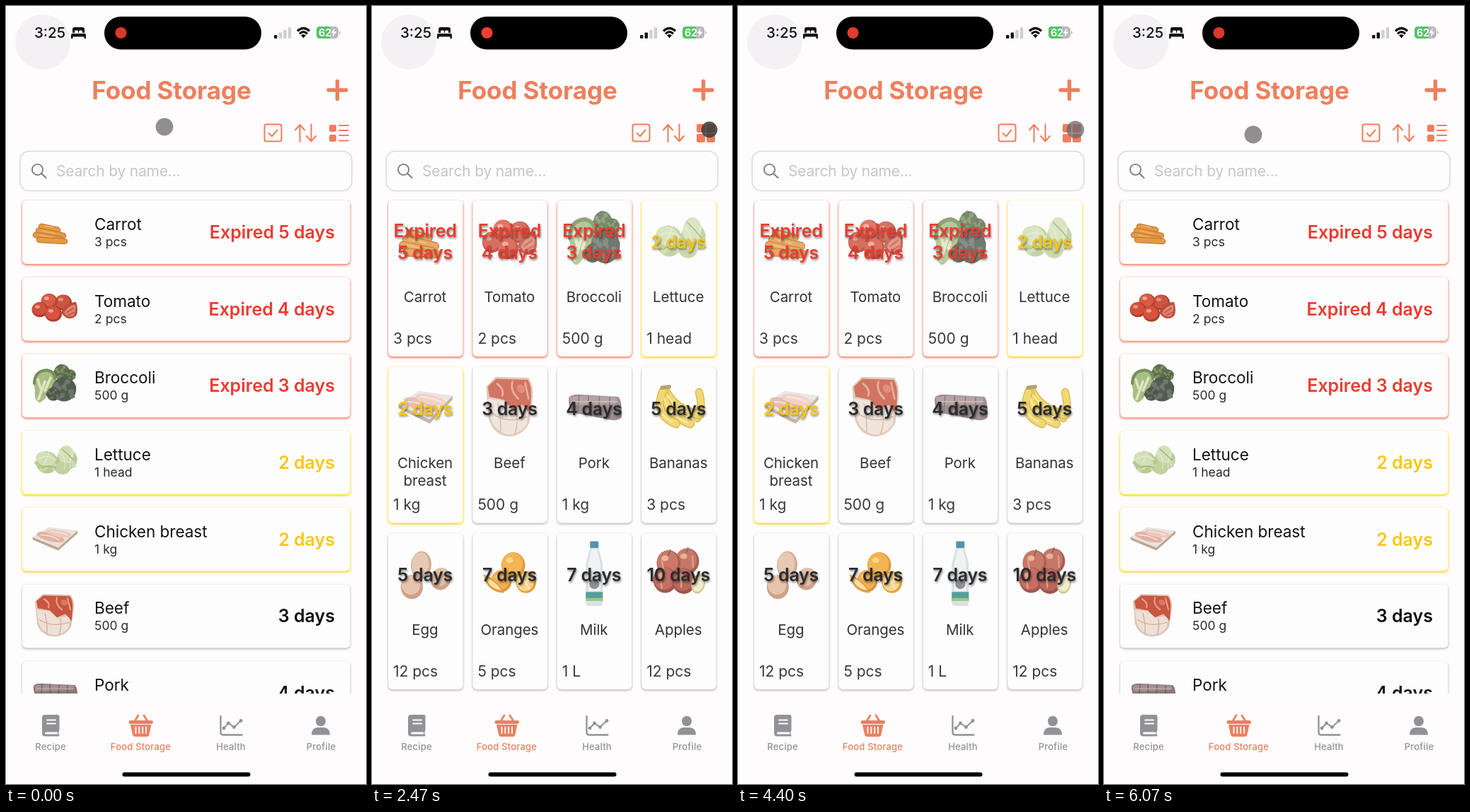
An HTML page for the animation above (6.14 s loop, 509 by 1101 pixels).

```html
<!DOCTYPE html>
<html lang="en">
<head>
<meta charset="utf-8">
<title>Food Storage</title>
<style>
  html, body { margin: 0; width: 100%; height: 100%; overflow: hidden; background: #fefcfd; }
  svg { display: block; width: 100%; height: 100%; font-family: Inter, "Liberation Sans", sans-serif; }
  .red { --edge: #f5927c; }
  .yellow { --edge: #fbdc35; }
  .plain { --edge: #cbcacd; }
  .card { fill: #fefdfe; filter: drop-shadow(0 1.7px .9px var(--edge)) drop-shadow(0 1.2px .9px var(--edge)); }
  .due { font-size: 25px; font-weight: 600; }
  .red .due { fill: #ea3c30; }
  .yellow .due { fill: #f9c713; }
  .plain .due { fill: #0c0c0d; }
  .grid .due { letter-spacing: -.3px; filter: drop-shadow(1px 2px 1.4px rgba(0, 0, 0, .45)); }
  .grid .plain .due { fill: #2b2a2c; }
  .grid .art { opacity: .82; }
  .name { font-size: 22.6px; letter-spacing: -.06px; fill: #121213; }
  .qty { font-size: 17.5px; letter-spacing: .05px; fill: #29292b; }
  .grid .name { font-size: 20.5px; fill: #333235; }
  .grid .qty { font-size: 21px; letter-spacing: 0; fill: #39383b; }
  .mid { text-anchor: middle; }
  .end { text-anchor: end; }
  .tab { font-size: 13px; font-weight: 500; letter-spacing: .2px; text-anchor: middle; }
</style>
</head>
<body>
<svg id="stage" viewBox="0 0 509 1101" xmlns="http://www.w3.org/2000/svg"></svg>
<script>
const ORANGE = '#ee7f5d', GREY = '#929196';
const LOOP = 6140, STEP = LOOP / 92;

const text = (x, y, cls, str, extra = '') => `<text x="${x}" y="${y}" class="${cls}" ${extra}>${str}</text>`;
const rect = (x, y, w, h, r, fill, extra = '') =>
  `<rect x="${x}" y="${y}" width="${w}" height="${h}" rx="${r}" fill="${fill}" ${extra}/>`;
const oval = (x, y, rx, ry, fill, turn = 0) =>
  `<ellipse cx="${x}" cy="${y}" rx="${rx}" ry="${ry}" fill="${fill}" transform="rotate(${turn} ${x} ${y})"/>`;
const shape = (d, fill) => `<path d="${d}" fill="${fill}"/>`;
const line = (d, color, w, extra = '') =>
  `<path d="${d}" fill="none" stroke="${color}" stroke-width="${w}" stroke-linecap="round" stroke-linejoin="round" ${extra}/>`;
const group = (x, y, body, extra = '', scale = '') =>
  `<g transform="translate(${x} ${y}) ${scale}" ${extra}>${body}</g>`;

// A ball with a darker rim and a soft highlight
const ball = (x, y, r, fill, rim, light) =>
  oval(x, y, r, r * .92, rim) + oval(x - r * .08, y - r * .1, r * .88, r * .8, fill) +
  oval(x - r * .3, y - r * .35, r * .3, r * .2, light);

// Bumpy head: small circles around a centre
function floret(x, y, r, fill, light) {
  let out = oval(x, y, r * .86, r * .86, fill);
  for (let i = 0; i < 18; i++) {
    const a = i * 2.4, d = r * .8 * Math.sqrt(i / 18);
    out += oval(x + d * Math.cos(a), y + d * Math.sin(a), r * .2, r * .17, i % 2 ? fill : light);
  }
  return out;
}

const stick = d => line(d, '#c0702a', 8.5) + line(d, '#e39a45', 6.5);
const banana = d => line(d, '#cda62f', 9.5) + line(d, '#efd052', 7.5);

const art = {
  Carrot: () => stick('M-19 -7L4 -2') + stick('M-23 -1L12 6') + stick('M-27 5L8 11') +
    stick('M-22 12L14 14') + line('M-14 -8L-3 -6M-18 -1L0 3M-21 5L-5 8', '#f2b45e', 1.6),
  Tomato: () => ball(12, -8, 12, '#cb5540', '#ad3d2e', '#e6907c') + ball(-8, -10, 11.5, '#d75c46', '#b5402f', '#f0a592') +
    ball(-21, 2, 11.5, '#d0503c', '#ab3b2b', '#ea9683') + ball(-2, 8, 12, '#d6533f', '#ae3b2c', '#efa08b') +
    shape('M9 6Q15 -8 30 -9Q34 4 30 11Q18 20 9 6Z', '#bd4c3b') +
    shape('M13 6Q19 -4 29 -5Q30 6 26 11Q17 14 13 6Z', '#dd8573') +
    line('M17 6L26 0M19 10L27 6', '#c65b49', 2),
  Broccoli: () => floret(10, -18, 13, '#5e7250', '#7f9268') + floret(22, -14, 9, '#566a48', '#788c62') +
    shape('M-30 -3Q-30 -20 -12 -22Q4 -18 2 0L-9 8Q-11 20 -21 25Q-30 22 -28 8Z', '#a9bd84') +
    line('M-23 20L-14 -5M-14 8L-6 -10M-20 5L-24 -8', '#dfe6c4', 3.5) +
    line('M-29 -2Q-29 -20 -11 -21Q0 -19 0 -9', '#76905a', 4) +
    floret(13, 6, 20, '#525d52', '#6d786b') + floret(-2, 13, 11, '#4d584d', '#68735f'),
  Lettuce: () => floret(17, -3, 17, '#b9cb96', '#cfdcb2') + oval(16, -10, 11, 13, '#d3e0b7') +
    floret(-11, 1, 18, '#b7ca93', '#cad9ab') + oval(-13, -4, 14, 10, '#d2dfb6', 15) + oval(11, 9, 11, 9, '#c2d29f') +
    line('M-24 -3Q-12 -12 2 -3M-16 4Q-10 -6 -8 -13M7 -14Q16 -6 14 10M26 -13Q20 -4 22 9', '#e4ecd1', 1.2) +
    line('M-18 9Q-9 3 2 9M10 -18Q20 -10 27 -2', '#98b274', 1.2),
  'Chicken breast': () => shape('M-32 -2L-8 -16L32 -11L5 13Z', '#e8e2df') + shape('M-32 -2L5 13L32 -11L32 -7L5 17L-31 2Z', '#bda58f') +
    oval(-6, -2, 20, 6, '#e2b1a3', 14) + oval(6, -7, 18, 5, '#edc9bd', 10) + line('M-20 -5Q-6 -5 6 2M-6 -10Q8 -9 18 -5', '#f7e2da', 1.5),
  Beef: () => shape('M-28 -20L-17 -30L22 -29Q28 -22 27 -10L23 16Q15 30 -2 30Q-20 28 -25 12Z', '#dcc1b0') +
    shape('M-26 -8L-8 -6L4 4L22 0L20 17Q12 28 -2 28Q-19 25 -23 10Z', '#eee0d6') +
    shape('M-26 -20L-16 -28L21 -27Q26 -21 25 -9L24 8L15 -2L3 3L-7 -7L-24 -10Z', '#c85640') +
    line('M-15 -23Q-6 -17 -9 -11M3 -25Q0 -16 10 -8M18 -24L22 -8', '#e3a08c', 2.2) + oval(13, -18, 5, 4, '#da7862', 30) +
    line('M-22 6Q-4 18 20 10M-14 -3Q-10 14 -11 25M8 5Q10 16 6 27', '#cdac99', 1.2),
  Pork: () => shape('M-30 -9Q-27 -13 -15 -12L28 -10Q33 -7 32 11Q27 15 17 13L-25 6Q-31 2 -30 -9Z', '#8b787b') +
    shape('M-29 -9Q-20 -13 27 -9L26 -3L-27 -1Z', '#a68f90') +
    line('M-18 -11L-19 4M-7 -11L-6 7M6 -10L5 9M18 -9L18 11', '#6c5d61', 1.3) + line('M-25 -5L27 -5', '#c4acaa', 1.2),
  Bananas: () => banana('M24 -14Q29 0 22 11') + banana('M-15 -16Q-4 4 25 8') +
    banana('M-17 -16Q-17 8 14 17') + banana('M-19 -15Q-30 8 -3 17') +
    line('M-13 -11Q-2 4 20 7M-17 -8Q-12 9 10 16M-23 -4Q-24 8 -8 15', '#f9e693', 1.8) + line('M-20 -19L-11 -20', '#a6914a', 4),
  Egg: () => oval(-5, -8, 12, 14, '#ca9b7d', 8) + oval(-6, -9, 10, 12, '#e3bea4', 8) +
    oval(18, 6, 12, 11, '#c49272', -20) + oval(17, 4, 10, 9, '#dfb497', -20) +
    oval(-16, 14, 13, 12, '#c38f70') + oval(-17, 12, 11, 9.5, '#e2b89d'),
  Oranges: () => ball(4, -8, 14, '#f1a62f', '#d98518', '#f9cf75') + ball(-10, 8, 12, '#efa02b', '#d47f17', '#f9c768') +
    shape('M-31 1Q-28 19 -7 20Q-12 8 -31 1Z', '#dc8b20') + shape('M-28 4Q-24 16 -10 17Q-16 9 -28 4Z', '#fad98e') +
    oval(19, 9, 12, 11, '#df8c1c') + oval(18, 9, 10, 9, '#f8cf70') + line('M18 9L18 1M18 9L26 7M18 9L23 16M18 9L12 15M18 9L10 6', '#fdebbd', 1.2),
  Milk: () => rect(-5, -32, 10, 7, 1, '#2d7d97') + shape('M-5 -25L5 -25L10 -10L10 30Q10 33 7 33L-7 33Q-10 33 -10 30L-10 -10Z', '#d3dbde') +
    shape('M-3 -24L3 -24L7 -10L7 18L-7 18L-7 -10Z', '#eef1f2') + rect(-10, 19, 20, 9, 0, '#2f8c86') + rect(-10, 25, 20, 3, 0, '#8fba62') +
    oval(0, 11, 6, 5, '#77797d'),
  Apples: () => ball(10, -12, 14, '#b95a49', '#953a31', '#e0a382') + ball(-12, -10, 14, '#c05c48', '#983d32', '#e4ac89') +
    ball(-16, 7, 14, '#b95141', '#8f332c', '#dd9878') + ball(6, 8, 14, '#ad493c', '#88302a', '#d88f74') +
    line('M-20 -14L-18 -4M-22 4L-20 15M2 2L3 14M16 -17L17 -6', '#d58b6c', 2) +
    oval(23, 11, 8, 10, '#c9c287', 25) + oval(23, 11, 6, 8, '#f0e9c4', 25) + line('M-12 -18L-10 -23M9 -21L11 -25', '#6c4a2f', 1.6)
};

const foods = [
  ['Carrot', '3 pcs', -5], ['Tomato', '2 pcs', -4], ['Broccoli', '500 g', -3], ['Lettuce', '1 head', 2],
  ['Chicken breast', '1 kg', 2], ['Beef', '500 g', 3], ['Pork', '1 kg', 4], ['Bananas', '3 pcs', 5],
  ['Egg', '12 pcs', 5], ['Oranges', '5 pcs', 7], ['Milk', '1 L', 7], ['Apples', '12 pcs', 10]
];
const tone = days => days < 0 ? 'red' : days < 3 ? 'yellow' : 'plain';

function row([name, qty, days], i) {
  const due = days < 0 ? `Expired ${-days} days` : `${days} days`;
  return group(23, 275 + i * 108.65,
    rect(0, 0, 463.5, 90, 6, '#fff', 'class="card"') + group(46, 44, art[name]()) +
    text(102, 42, 'name', name) + text(102, 65, 'qty', qty) + text(442, 54, 'due end', due),
    `class="${tone(days)}"`);
}

function tile([name, qty, days], i) {
  const lines = days < 0 ? ['Expired', `${-days} days`] : [`${days} days`];
  const top = lines.length > 1 ? 52 : 68;
  return group(23 + (i % 4) * 119.4, 275 + Math.floor(i / 4) * 235.5,
    rect(0, 0, 105.5, 221, 6, '#fff', 'class="card"') +
    group(52.5, 56.5, art[name](), 'class="art"', 'scale(1.2 1.41)') +
    lines.map((s, k) => text(52, top + k * 31, 'due mid', s)).join('') +
    name.split(' ').map((s, k) => text(52, 143.5 + k * 25, 'name mid', s)).join('') +
    text(7, 202.5, 'qty', qty),
    `class="${tone(days)}"`);
}

const statusBar = () =>
  oval(52, 51, 39, 39, '#f3f1f4') +
  text(40, 45, '', '3:25', 'font-size="20.5" font-weight="500" fill="#111"') +
  shape('M94 38V33Q94 30 97 30H108Q111 30 111 33V38H108V36Q108 34.5 106.500 34.5H104.500Q103 34.5 103 36V38H102V36Q102 34.5 100.500 34.5H98.500Q97 34.5 97 36V38ZM92 46V41Q92 39 94 39H111Q113 39 113 41V46H110.500V43.500H94.500V46Z', '#111') +
  rect(139, 15, 222, 46.5, 23.2, '#000') +
  '<circle id="rec" cx="162.500" cy="38" r="8"/>' +
  [0, 1, 2, 3].map(i => rect(379 + i * 6.6, 41 - i * 3.6, 4.4, 5 + i * 3.6, 1.2, i ? '#cfced1' : '#111', `id="bar${i}"`)).join('') +
  line('M412 35.500Q420.500 27.500 429 35.500', '#111', 3.2, 'style="stroke-linecap:butt"') +
  line('M415 39.300Q420.500 34 426 39.300', '#111', 3, 'style="stroke-linecap:butt"') +
  shape('M417 41.500Q420.500 38.500 424 41.500L420.500 45.500Z', '#111') +
  rect(439, 29, 31, 17, 5, '#b9b8bb') + shape('M444 29H458V46H444Q439 46 439 41V34Q439 29 444 29Z', '#55c466') +
  shape('M471 35Q473 36 473 37.500Q473 39 471 40Z', '#b9b8bb') +
  text(442, 43, '', '62', 'font-size="14.5" font-weight="600" fill="#fff" letter-spacing="-.3"') +
  shape('M465 31L459.500 38.500H463L461.500 44L467.500 36.500H464Z', '#fff');

const header = () =>
  text(234, 131.5, 'mid', 'Food Storage', `font-size="35" font-weight="700" letter-spacing="-.1" fill="${ORANGE}"`) +
  line('M468.500 106.500V131.500M456 119H481', ORANGE, 5.4) +
  rect(20, 205.5, 469, 56, 13, '#fefdfe', 'stroke="#dad9dd" stroke-width="1.6"') +
  '<circle cx="44.500" cy="231.500" r="7.600" fill="none" stroke="#7e7d82" stroke-width="1.900"/>' + line('M50 237L56.500 243', '#7e7d82', 2.1) +
  text(71, 241, '', 'Search by name...', 'font-size="21" letter-spacing="-.2" fill="#c6c5c9"');

const tools = () =>
  rect(365.5, 167.5, 24, 24, 3, 'none', `stroke="${ORANGE}" stroke-width="2"`) +
  line('M371.500 180L376 184.500L383.500 175.500', ORANGE, 2) +
  line('M415.500 192V168.500M409 175.500L415.500 168L422 175.500M431.500 167.500V191M425 184L431.500 191.500L438 184', ORANGE, 2);

const listIcon = () =>
  rect(457, 168, 10, 10, 2.5, ORANGE) + rect(457, 182, 10, 10, 2.5, ORANGE) +
  line('M471 169H484M471 176H484M471 183H484M471 190.500H484', ORANGE, 1.8);

const gridIcon = () => [0, 1, 2, 3].map(i =>
  rect(459 + (i % 2) * 14, 167 + (i >> 1) * 14, 12, 12, 2, ORANGE)).join('');

const tabBar = () =>
  shape('M55 1003H73Q75.500 1003 75.500 1005.500V1025Q75.500 1026 74.500 1026.500V1031Q75.500 1031 75.500 1032Q75.500 1033.500 74 1033.500H55.500Q51 1033.500 51 1029V1007Q51 1003 55 1003Z', GREY) +
  line('M58 1010.500H70M58 1015.500H70', '#fefcfd', 1.9) + line('M56.500 1029H72', '#fefcfd', 3) +
  line('M182 1012L187 1004M200 1012L195 1004', ORANGE, 2.8) + rect(173.5, 1011, 34.5, 5, 2.4, ORANGE) +
  shape('M176 1017H205.500L202.500 1031Q202 1034 199 1034H182.500Q179.500 1034 179 1031Z', ORANGE) +
  line('M183.500 1020.500V1029M188.300 1020.500V1029M193.200 1020.500V1029M198 1020.500V1029', '#fefcfd', 1.9) +
  line('M303.500 1005V1028Q303.500 1031.500 307 1031.500H333.500', GREY, 2.3) +
  line('M308 1022L314.500 1015L322.500 1020.500L332 1011.500', GREY, 2) +
  [[308, 1022], [314.5, 1015], [322.5, 1020.5], [332, 1011.5]].map(([x, y]) => oval(x, y, 2.4, 2.4, GREY)).join('') +
  oval(445, 1012, 7, 7.3, GREY) + shape('M432 1031.500Q432 1021 441 1021H449Q458 1021 458 1031.500Z', GREY) +
  ['Recipe', 'Food Storage', 'Health', 'Profile'].map((s, i) =>
    text(63 + i * 127.5, 1052.5, 'tab', s, `fill="${i === 1 ? ORANGE : GREY}"`)).join('') +
  rect(164.5, 1084.5, 181, 6, 3, '#000');

const $ = id => document.getElementById(id);
$('stage').innerHTML =
  '<clipPath id="view"><rect y="266" width="509" height="707"/></clipPath>' +
  rect(0, 0, 509, 1101, 0, '#fefcfd') + statusBar() + header() +
  `<g id="tools">${tools()}</g><g id="listIcon">${listIcon()}</g><g id="gridIcon">${gridIcon()}</g>` +
  `<g clip-path="url(#view)"><g id="list">${foods.slice(0, 7).map(row).join('')}</g>` +
  `<g id="grid" class="grid">${foods.map(tile).join('')}</g></g>` +
  tabBar() + '<circle id="touch"/>';

const clamp = v => Math.min(1, Math.max(0, v));
const ramp = (t, a, b) => clamp((t - a) / (b - a));
const ease = p => p * p * (3 - 2 * p);
const mix = (a, b, p) => a + (b - a) * p;

const presses = [1230, 2400, 3690, 4640];
const HOLD = 165;

// [time, x, y] of the touch point
const path = [[0, 224, 171], [130, 224, 171], [870, 478, 172], [1070, 478, 172], [1300, 477, 175], [5270, 477, 175], [6000, 211, 182], [LOOP, 211, 182]];

function touchAt(t) {
  const i = Math.max(1, path.findIndex(k => k[0] > t));
  const [a, b] = [path[i - 1], path[i]], p = ease(ramp(t, a[0], b[0]));
  return [mix(a[1], b[1], p), mix(a[2], b[2], p)];
}

function draw(t) {
  let dark = 0, fade = 1, flips = 0;
  for (const p of presses) {
    const s = t - p;
    if (s >= HOLD) flips++;
    dark = Math.max(dark, Math.min(ramp(s, 0, 70), 1 - ramp(s, HOLD, HOLD + 90)));
    fade = Math.min(fade, 1 - .8 * Math.min(ramp(s, 80, 150), 1 - ramp(s, 235, 420)));
  }
  const isGrid = flips % 2 === 1;
  for (const [id, on] of [['list', !isGrid], ['listIcon', !isGrid], ['grid', isGrid], ['gridIcon', isGrid]])
    $(id).style.display = on ? '' : 'none';
  $('listIcon').style.opacity = $('gridIcon').style.opacity = fade;
  $('tools').setAttribute('transform', `translate(${isGrid ? 3 : 0} 0)`);

  const [x, y] = touchAt(t), shade = mix(102, 58, dark);
  const touch = $('touch');
  touch.setAttribute('cx', x);
  touch.setAttribute('cy', y);
  touch.setAttribute('r', mix(12.4, 11.4, dark));
  touch.setAttribute('fill', `rgba(${shade},${shade - 2},${shade + 2 - 4 * dark},${mix(.72, .85, dark)})`);

  const dim = Math.max(0, Math.cos(t / LOOP * 8 * Math.PI));
  $('rec').setAttribute('fill', `rgb(${mix(245, 216, dim)},${mix(62, 58, dim)},${mix(52, 42, dim)})`);
  $('bar1').setAttribute('fill', t < 500 ? '#cfced1' : '#111');
}

const start = performance.now();
function tick() {
  const t = (performance.now() - start) % LOOP;
  draw(Math.floor((t + 5) / STEP) % 92 * STEP);
  requestAnimationFrame(tick);
}
tick();
</script>
</body>
</html>
```
